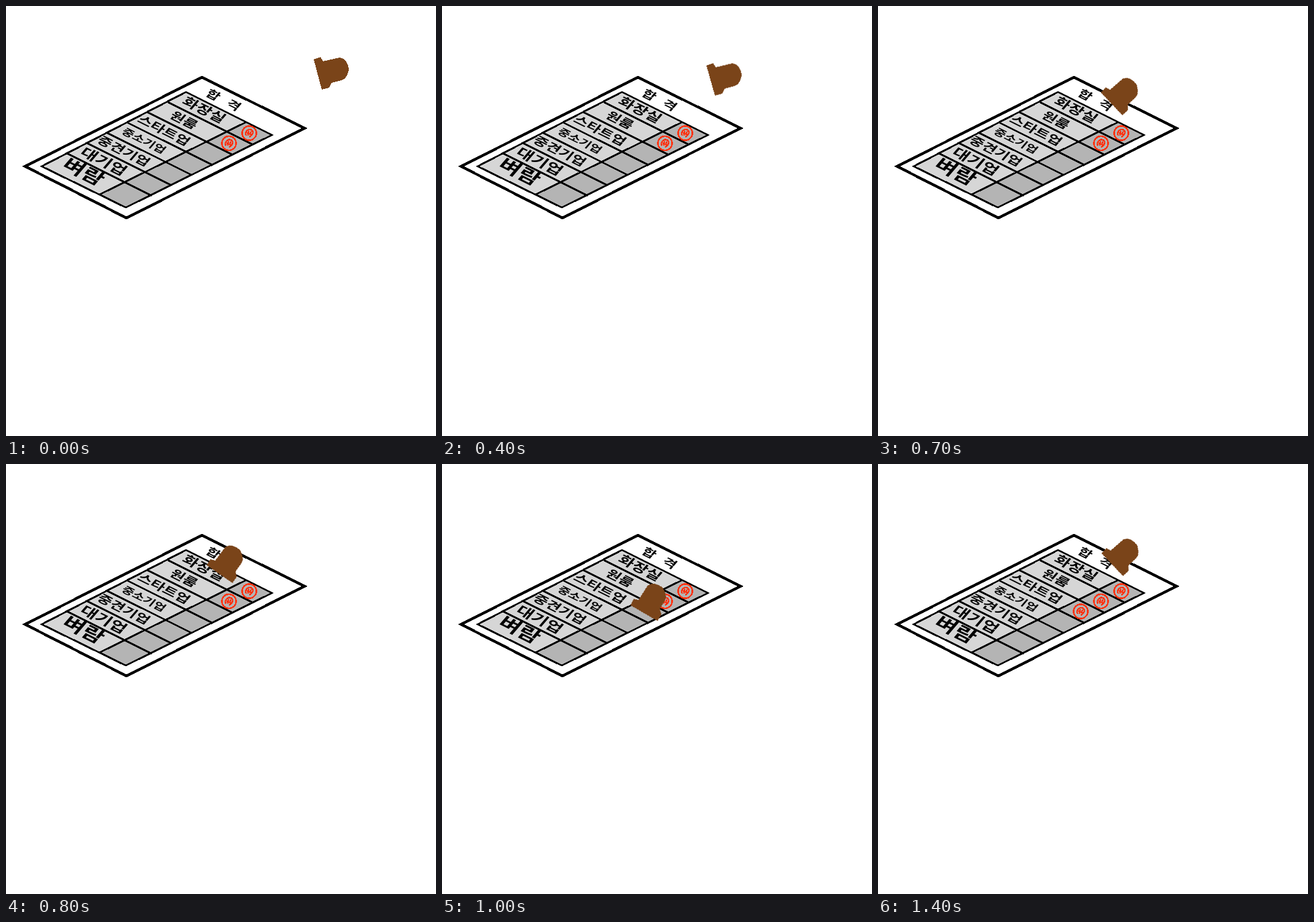
These frames come from a looping animation (700x700 px, 6.4 s). An HTML page:

```html
<!DOCTYPE html>
<html lang="ko">
<head>
<meta charset="utf-8">
<title>합격 도장</title>
<style>
  html, body { margin: 0; width: 100%; height: 100%; overflow: hidden; background: #fff; }
  svg { display: block; width: 100%; height: 100%; shape-rendering: crispEdges; }
  text {
    font-family: "Noto Sans CJK KR", "Noto Sans CJK", sans-serif;
    font-weight: 700; text-anchor: middle; word-spacing: .38em;
  }
  #stamper { transform-origin: 0 0; transform-box: view-box; }
</style>
</head>
<body>
<svg viewBox="0 0 700 700">
  <path d="M319 116L486 199L196 345L31 261Z" fill="#fff" stroke="#000" stroke-width="4.4"/>
  <path d="M293 140L391 189L152 307L58 261Z" fill="#d6d6d6"/>
  <path d="M391 189L433 210L195 328L152 307Z" fill="#b4b4b4"/>
  <path id="grid" fill="none" stroke="#000" stroke-width="3"/>
  <g id="labels"></g>
  <g id="seals" fill="none" stroke="#ff3210" stroke-width="2.4"></g>
  <path id="stamper" fill="#7a4419"
    d="M0 0L11 -4L15 3L42 -3C51 -2 57 6 57 17C55 27 51 32 45 34L29 38L25 46L13 49Z"/>
</svg>
<script>
const LOOP = 6400, STEP = 100, SEAL_TIME = 1100;
const $ = id => document.getElementById(id);

function add(parent, tag, attrs, text = '') {
  const el = document.createElementNS('http://www.w3.org/2000/svg', tag);
  for (const key in attrs) el.setAttribute(key, attrs[key]);
  el.textContent = text;
  parent.append(el);
  return el;
}

// Left end of the line above a row
const rowStart = row => [296 - 32.7 * row, 139.5 + 16.8 * row];

function addLabel(word, x, y, size) {
  add($('labels'), 'text', {
    transform: `matrix(.88 .44 -.5 .58 ${x} ${y})`, 'font-size': size, dy: '.37em'
  }, word);
}

function addSeal(row) {
  const seal = add($('seals'), 'g', { transform: `translate(${396 - 33 * row} ${207 + 16.5 * row})` });
  add(seal, 'circle', { r: 11.6 });
  add(seal, 'path', { d: 'M-5 4C-8 -3 -1 -8 4 -5C8 -2 5 4 0 6M-4 0L3 2M-1 -4L-2 4M3 -3L1 3' });
  return seal;
}

const labels = [
  ['화장실', 27], ['원룸', 25], ['스타트업', 25], ['중소기업', 21],
  ['중견기업', 25], ['대기업', 29], ['벼람', 38]
];
let grid = 'M293 140L433 210L195 328L58 261ZM391 189L152 307';
labels.forEach(([word, size], row) => {
  if (row) grid += `M${rowStart(row)}l137.5 68.7`;
  const [x, y] = rowStart(row + .5);
  addLabel(word, x + 43, y + 21, size);
});
$('grid').setAttribute('d', grid);
addLabel('합 격', 354, 153, 24);

const [, , newSeal] = [0, 1, 2].map(addSeal);

function loop(el, frames) {
  el.animate(frames.map(f => ({ easing: 'steps(1, end)', ...f })),
    { duration: LOOP, iterations: Infinity });
}

// Poses are x, y, degrees; each move eases every component by its own power
const rest = [501, 87, 0], hover = [363, 141, -28.5], press = [307, 230, -45], lifted = [364, 145.5, -28.5];
const moves = [
  { start: 0, end: 7, from: rest, to: hover, powers: [1.2, 3, 6] },
  { start: 7, end: 10, from: hover, to: press, powers: [.4, 1.2, .3] },
  { start: 10, end: 14, from: press, to: lifted, powers: [2, 1.4, 4] }
];

function poseAt(step) {
  const { start, end, from, to, powers } = moves.find(m => step <= m.end);
  const u = (step - start) / (end - start);
  return from.map((v, i) => v + (to[i] - v) * u ** powers[i]);
}

const frames = Array.from({ length: 15 }, (_, step) => {
  const [x, y, angle] = poseAt(step);
  return { offset: step * STEP / LOOP, transform: `translate(${x}px, ${y}px) rotate(${angle}deg)` };
});
loop($('stamper'), [...frames, { ...frames.at(-1), offset: 1 }]);

loop(newSeal, [
  { offset: 0, opacity: 0 },
  { offset: SEAL_TIME / LOOP, opacity: 1 },
  { offset: 1, opacity: 1 }
]);
</script>
</body>
</html>
```
